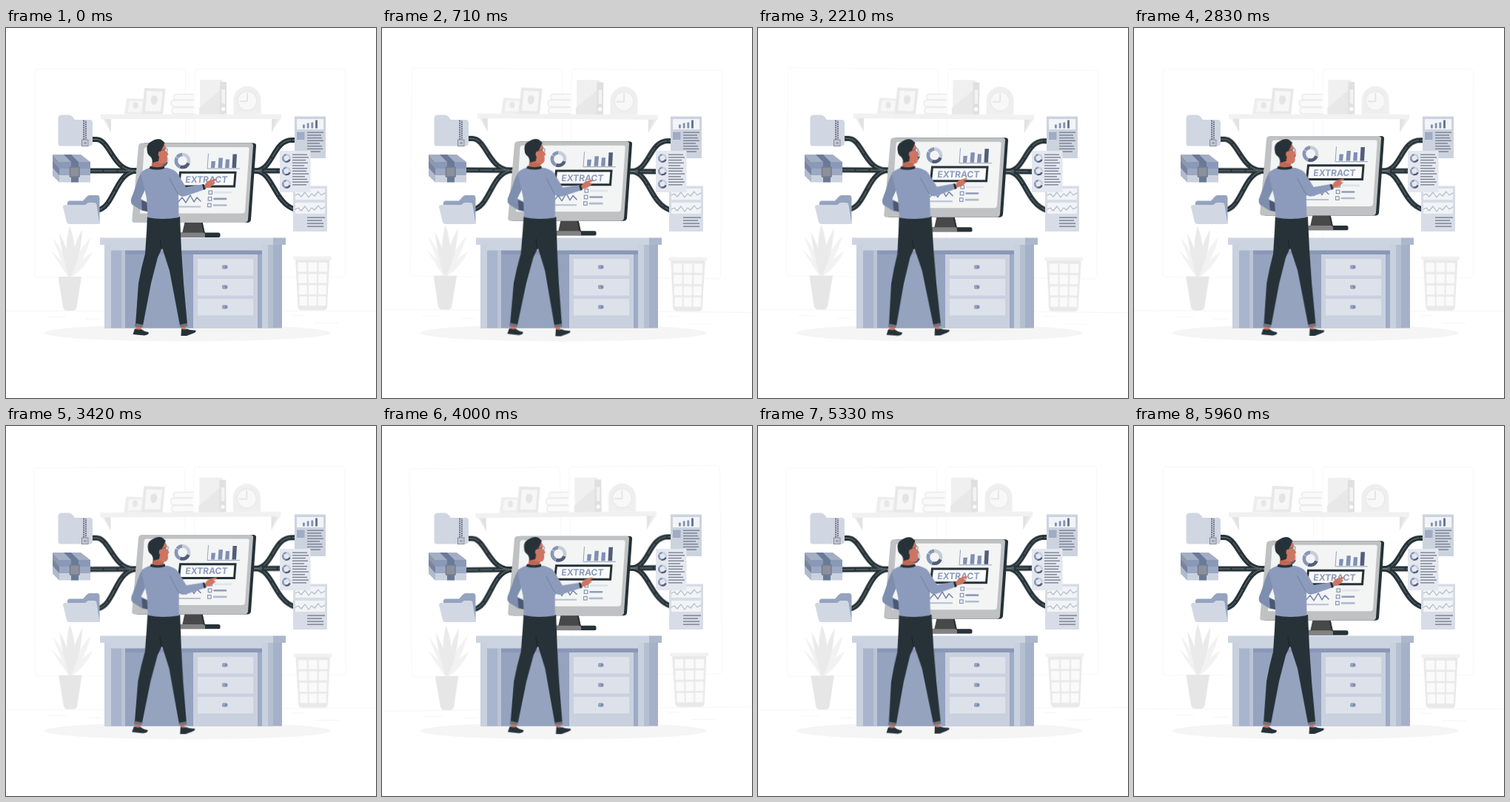
Recreate the animation shown at these times as an HTML page. Size 500 by 500 pixels, loop 6 s.

```html
<!DOCTYPE html>
<html lang="en">
<head>
<meta charset="utf-8">
<title>Data extraction</title>
<style>
html,body{margin:0;width:100%;height:100%;overflow:hidden;background:#fff}
svg{display:block;width:100vw;height:100vh}
g{transform-box:view-box}
.line{fill:none;stroke-linecap:round;stroke-linejoin:round}
</style>
</head>
<body>
<svg viewBox="0 0 500 500">
<defs>
  <path id="shell" d="M184 155.500H330Q334.300 155.500 334 159L327 259Q326.500 263 322 263H174Q170 263 170.300 259L179 159.500Q179.500 155.500 184 155.500z"/>
</defs>

<g id="room">
  <g fill="#fff" stroke="#f7f7f7">
    <rect x="39" y="55.500" width="203.500" height="281.500" rx="4"/>
    <rect x="255" y="55.500" width="203.500" height="281.500" rx="4"/>
  </g>
  <path d="M0 382.300H500M56 390.500H81M108 393.500H127M386 388.500H403M416 398.500H449" stroke="#f3f3f3" stroke-width=".8"/>
  <!-- shelf -->
  <path d="M131 122.500H142V141zM371 122.500H359V141z" fill="#ececec"/>
  <path d="M134 122.500H142V141zM366 122.500H359V141z" fill="#e2e2e2"/>
  <path d="M128 116.500H372V123H128z" fill="#f1f1f1"/>
  <path d="M163 95L188 96 185 116.500H160z" fill="#ededed"/>
  <path d="M167 98.500L185 99 183 113.500H164.500z" fill="#f7f7f7"/>
  <ellipse cx="175" cy="104.500" rx="3.500" ry="4.500" fill="#e6e6e6"/>
  <path d="M187 81L215.500 82 212 116.500H184z" fill="#e8e8e8"/>
  <path d="M190.500 85L211.500 86 209 112.500H188z" fill="#f7f7f7"/>
  <path d="M197 92Q205 89 205 97 204 104 199 104 194 101 197 92" fill="#e4e4e4"/>
  <g fill="#fafafa" stroke="#ebebeb" stroke-width="1.500">
    <path d="M254 89.500H230Q226.500 89.500 227 93 226.500 97 230 97H254"/>
    <path d="M253 97.500H227Q223 98 223 102 223 106 227 106.500H253"/>
    <path d="M254 107.500H228Q224 108 224 111.500 224 115.500 228 116H254"/>
  </g>
  <path d="M262 72Q262 70 264 70H291Q294 70 294 73V116.500H262z" fill="#f0f0f0"/>
  <path d="M289 84V116.500H261V108z" fill="#e8e8e8"/>
  <path d="M289 73H298V116.500H289z" fill="#e0e0e0"/>
  <path d="M291.500 83H296V102H291.500z" fill="#f3f3f3"/>
  <circle cx="293.500" cy="109.500" r="2.700" fill="#fafafa"/>
  <path d="M307.500 116.500V97A18.500 18.500 0 0 1 344.500 97V116.500z" fill="#efefef"/>
  <circle cx="326" cy="98.500" r="13" fill="#f8f8f8" stroke="#e9e9e9" stroke-width="1.500"/>
  <path class="line" d="M326 88V99H316" stroke="#e0e0e0" stroke-width="1.500"/>
  <!-- plant -->
  <g id="leaves"></g>
  <path d="M70.500 336H102L95.500 377Q94.500 382 90 382H83Q78 382 77 377z" fill="#e6e6e6"/>
  <!-- basket -->
  <path d="M391 312H437.500L434 377Q433.500 381.500 429 381.500H400Q395 381.500 394.500 377z" fill="#e9e9e9"/>
  <g id="cells"></g>
  <path d="M388 308.500H440V313H388z" fill="#f1f1f1"/>
</g>

<ellipse cx="245" cy="412" rx="193.500" ry="11.500" fill="#f5f5f5"/>

<g id="desk"></g>
<g id="drawers"></g>
<g id="cables"></g>

<g id="monitor">
  <path d="M242 260H265L269 278H238z" fill="#484848"/>
  <path d="M263 260H265L269 278H267z" fill="#263238"/>
  <rect x="232" y="276.500" width="57.500" height="6.500" rx="2.500" fill="#263238"/>
  <path d="M234 276.500H266Q269 276.500 269 279V283H234z" fill="#828282"/>
  <use href="#shell" x="4" fill="#263238"/>
  <use href="#shell" fill="#bfc1c3"/>
  <path d="M190 161H326Q329 161 328.700 164L323 247Q322.500 250.500 319 250.500H181L186.500 164Q187 161 190 161z" fill="#f3f4f4"/>
  <g id="donuts"></g>
  <path class="line" d="M273.500 170L272 190H315.500" stroke="#96a4c0"/>
  <g fill="#8090b2">
    <path d="M277.500 180H283L282 189H277zM287.500 175.500H293L292 189H286.500zM297 177.500H302L301.500 189H296z"/>
    <path d="M306.500 170.500H312L311 189H305.500z" fill="#525d7a"/>
  </g>
  <path d="M235.500 195.300H310L308.500 214H233.500z" fill="#fafafa" stroke="#263238" stroke-width="3"/>
  <text x="271" y="209" text-anchor="middle" transform="translate(21.500 0) skewX(-6)" font-family="Inter,'Open Sans',sans-serif" font-weight="700" font-size="12" fill="#8c9bbc">EXTRACT</text>
  <path class="line" d="M232 236L238 229 243 236 249 226 254 235 258 229 263 234" stroke="#7587a9" stroke-width="1.500"/>
  <path d="M230 241.500H263" stroke="#b7c1d2" stroke-width="2"/>
  <g id="checks"></g>
</g>

<!-- zipped folder -->
<path d="M70.500 122Q70.500 117.500 75 117.500H85Q88 117.500 90 120L93 124H113Q117 124 117 128V155Q117 159.500 112.500 159.500H74Q70.500 159.500 70.500 156z" fill="#d0d6e2"/>
<path d="M106.500 124V151" stroke="#b8c0cf" stroke-width="5"/>
<path d="M105 125V151M108 126.500V151" stroke="#6a7080" stroke-width="2" stroke-dasharray="1.400 1.600"/>
<rect x="102.500" y="151" width="8.500" height="8.500" fill="#c6cbd4" stroke="#858b98"/>
<path d="M105 154H109V157H105z" fill="#a0a6b2"/>

<!-- packed box -->
<path d="M63 171H101L114 181H72z" fill="#a3aec5"/>
<path d="M63 171L72 181V208.500L63 199z" fill="#8c98ae"/>
<path d="M63 180L72 190V199L63 189z" fill="#7885a0"/>
<path d="M63 189L72 199V208.500L63 199z" fill="#b1bbcb"/>
<path d="M72 181H114V190H72z" fill="#8a99b8"/>
<path d="M72 190H114V199H72z" fill="#9ba8c2"/>
<path d="M72 199H114V208.500H72z" fill="#cbd2df"/>
<path d="M78 171H88L98 181V208.500H88V181z" fill="#6a7998"/>
<rect x="86.500" y="188" width="12.500" height="13" fill="#8b919c" stroke="#767d89" stroke-width="1.500"/>

<!-- open folder -->
<path d="M83 237Q83 233.500 86 233.500H104L109 228Q111 226 113 226H123Q126.500 226 126.500 230V264H84z" fill="#95a3bf"/>
<path d="M80 239H107L111 236H119Q122 236 122.500 239L126.500 265H86Q82.500 265 82 262L77 242Q77 239 80 239z" fill="#d1d8e4"/>

<g id="docs"></g>

<g id="man">
  <!-- far arm -->
  <path d="M184 194Q179 200 175 215L169 231Q168 236 171 239L184 247 191 248 190 235 182 231 191 212z" fill="#7e8eae"/>
  <path d="M183 233L191 236V248L184 246z" fill="#4c5771"/>
  <!-- shoes -->
  <path d="M176 402H183.500L182.500 408H175zM236 402H243L242.500 408H237.500z" fill="#cf7561"/>
  <path d="M174 406.500Q179 408.500 183 407 187 410.500 192.500 411 194 414.500 187 415.500L171.500 414z" fill="#263238"/>
  <path d="M237 406.500Q241 408.500 244 406.500 250 409 256 408.500 258.500 410.500 252 413L244 416H236.500z" fill="#263238"/>
  <!-- trousers -->
  <path d="M191 255H235L237 300 240 345 245 400 235 402 221 328 211 297 205 310 196 345 185 402 175 401 179 345 183 325 188 305 190 275z" fill="#263238"/>
  <path class="line" d="M208 285Q208 293 211 299" stroke="#172126"/>
  <path d="M174.500 399L185 401 184.500 404.500 174 403.500zM234.500 401L245 399 245.500 403 235.500 404.500z" fill="#707481"/>
  <!-- neck and head -->
  <path d="M198 177L212 180 213 191H196z" fill="#bd6855"/>
  <path d="M203 161L213 155 216 161 217 166 219.500 171 217.500 173 218 178Q217.500 183.500 212 183.500L201 181z" fill="#cf7561"/>
  <path d="M190.500 164Q190 156 197 153 204 148.500 210 151L214.500 155 212 161 209 167 207 174 206 180 198 182Q198 175 193 172 190.500 169 190.500 164z" fill="#263238"/>
  <ellipse cx="208" cy="170.500" rx="2.300" ry="3.800" fill="#cf7561"/>
  <path class="line" d="M208 166L214 164.500" stroke="#455a64" stroke-width=".8"/>
  <ellipse cx="216.500" cy="165" rx="1.700" ry="2.700" fill="#dfe5ec" stroke="#5c6675" stroke-width=".7"/>
  <!-- sweater -->
  <path d="M182 196Q186 191 195 188.500L213 188.500Q224 189 228 194L233 220 233.500 256Q211 260 191.500 256L190 230z" fill="#8c9bbc"/>
  <path d="M195 186.500Q204 190 214 186.500V190Q204 193 193.500 190z" fill="#263238"/>
  <!-- near arm -->
  <path d="M268 213Q271 207 275 206L283.500 203.500 284 205.500 279 208 283 209 280 212 276 215 268 217z" fill="#cf7561"/>
  <path d="M219 192Q227 190 232 197L243 215 267 211 269 218 243 227Q236 229 231 222L221 206z" fill="#8c9bbc"/>
  <path class="line" d="M221 203L231 222Q234 227 239 227" stroke="#6b7b9d" stroke-width=".9"/>
  <path d="M265 211.500L267.500 211 270 217.500 267 219z" fill="#263238"/>
</g>
</svg>

<script>
const $ = id => document.getElementById(id);
const rect = (x, y, w, h, fill, r = 0) =>
  `<rect x="${x}" y="${y}" width="${w}" height="${h}" rx="${r}" fill="${fill}"/>`;
const line = (d, color, width, extra = '') =>
  `<path class="line" d="${d}" stroke="${color}" stroke-width="${width}" ${extra}/>`;
const range = (n, draw) => Array.from({ length: n }, (_, i) => draw(i)).join('');

// Ring with a pale base and coloured arcs.
function donut(x, y, r, width) {
  const arc = (from, share, color) =>
    `<circle cx="${x}" cy="${y}" r="${r}" fill="none" stroke="${color}" stroke-width="${width}"
      pathLength="100" stroke-dasharray="${share} ${100 - share}" stroke-dashoffset="${-from}"/>`;
  return arc(0, 100, '#c5ccda') + arc(32, 26, '#8796b5') + arc(6, 25, '#525d7a') + arc(60, 14, '#8796b5');
}

const textLines = (x, y, widths, step) => widths.map((w, i) =>
  rect(x, y + i * step, w, 1.3, '#737b8b')).join('');

// Slim leaf rising from the pot and bending out to its tip.
function leaf(x, y, width, color) {
  const base = 86 + (x - 86) * 0.06, bend = base + (x - base) * 0.3, midY = (y + 336) / 2;
  return `<path d="M${base} 337Q${bend - width} ${midY} ${x} ${y}Q${bend + width * 1.6} ${midY + 6} ${base} 337z" fill="${color}"/>`;
}
const leafTips = [[61, 301], [117, 303], [63, 283], [115, 282], [72, 277], [103, 272], [86, 267]];
$('leaves').innerHTML = leafTips.map(([x, y], i) =>
  leaf(x, y, i < 6 ? 6 : 9, i < 4 ? '#f2f2f2' : '#eaeaea')).join('');

$('cells').innerHTML = range(12, i => {
  const row = Math.floor(i / 3), col = i % 3;
  const squeeze = 1 - row * 0.035;
  return rect(414.3 + (col - 1) * 14 * squeeze - 5.9 * squeeze, 317 + row * 15.2, 11.8 * squeeze, 12.6, '#fafafa', 1);
});

$('desk').innerHTML = [
  [133, 292, 240, 113.5, '#a5b1c9'],
  [133, 292, 9, 113.5, '#c9d1df'],
  [142, 300, 16, 105.5, '#a9b5cc'],
  [156, 300, 5, 105.5, '#bbc5d6'],
  [161, 300, 92, 105.5, '#96a3bf'],
  [161, 300, 185, 6, '#8a98b7'],
  [142, 293, 219, 7.5, '#ccd4e1'],
  [253, 306, 88, 99.5, '#c9d1df'],
  [340, 306, 6, 99.5, '#9eabc5'],
  [346, 293, 8, 112.5, '#c9d1df'],
  [354, 293, 7, 112.5, '#b4bfd2'],
  [127, 283.5, 235, 9.5, '#ccd4e2'],
  [361, 283.5, 17, 9.5, '#abb7cd']
].map(part => rect(...part)).join('');

$('drawers').innerHTML = range(3, i => {
  const y = 312 + i * 27;
  return rect(259, y, 75, 22.5, '#dde1ea') +
    rect(292, y + 8.5, 7.5, 5, '#7f8fae', 2) + rect(292, y + 8.5, 4, 5, '#96a3bf', 2);
});

const cablePaths = [
  'M114 193H182',
  'M117 150.500H122C140 150.500 145 192.500 172 192.500H182',
  'M124 246C145 243 148 199 172 193.500H182',
  'M330 193H372',
  'M330 193H337C361 192.500 361 151.500 386 151.500H391',
  'M330 193H337C361 194 362 236 390 245'
];
$('cables').innerHTML =
  cablePaths.map(d => line(d, '#263238', 7)).join('') +
  cablePaths.map(d => line(d, '#84908f', 0.8, 'stroke-dasharray="16 3"')).join('');

$('donuts').innerHTML = donut(238.5, 179.5, 8.6, 4.5) + donut(209.5, 178, 8, 4);
$('checks').innerHTML = [[24, '#dfe3ea'], [18, '#8f9dbc'], [19, '#b1bbce']].map(([w, color], i) => {
  const x = 274 - i * 0.7, y = 220 + i * 8.6;
  return `<rect x="${x}" y="${y}" width="4.5" height="4.5" fill="#fff" stroke="#8392b1" stroke-width="1.2"/>` +
    rect(x + 7, y + 1, w, 2.6, color, 1);
}).join('');

const wave = y => line(`M391 ${y}l4-2 4 4 5-6 5 7 4-5 4 3 5-6 4 5 5-3`, '#b3bdcd', 1.2);
$('docs').innerHTML =
  rect(390, 119.5, 42, 56.5, '#ccd3df') + rect(393, 123, 36, 14, '#f2f4f7') +
  [5, 7, 8, 11].map((h, i) => rect(401 + i * 5.7, 135.5 - h, 2.8, h, i < 3 ? '#8191b1' : '#5e6e90')).join('') +
  rect(393, 140.5, 10.5, 10.5, '#a0acc4') +
  textLines(407, 140.5, [22, 19, 20, 22, 17, 20, 21, 18], 3.7) +
  rect(388, 213.5, 46, 61.5, '#d7dce6') +
  rect(391, 217, 40, 15, '#f1f3f6') + rect(391, 236, 40, 15, '#f1f3f6') +
  wave(226) + wave(245) +
  textLines(407, 255.5, [24, 20, 22, 22], 4) +
  rect(370, 166, 41.5, 56, '#e4e7ef') +
  range(3, i => donut(379, 176 + i * 17.4, 4.8, 2.3)) +
  textLines(387, 170.5, [20, 22, 18, 21, 16, 20, 19, 22, 17, 20, 22, 19], 3.7);

// Sway to one side, then the other; float up and back. Both at even speed.
const sway = [
  { transform: 'rotate(0deg)', offset: 0 },
  { transform: 'rotate(1deg)', offset: 0.25 },
  { transform: 'rotate(-1deg)', offset: 0.75 },
  { transform: 'rotate(0deg)', offset: 1 }
];
const rise = ['0px', '-10px', '0px'].map(y => ({ transform: `translateY(${y})` }));

function loop(id, frames, duration, origin = '0 0') {
  $(id).style.transformOrigin = origin;
  return $(id).animate(frames, { duration, iterations: Infinity, easing: 'linear' });
}
const start = document.timeline.currentTime;
[
  loop('room', sway, 6000, '250px 227px'),
  loop('cables', sway, 6000, '252px 198px'),
  loop('monitor', rise, 6000),
  loop('man', sway, 3000, '214px 284px')
].forEach(motion => { motion.startTime = start; });
</script>
</body>
</html>
```
